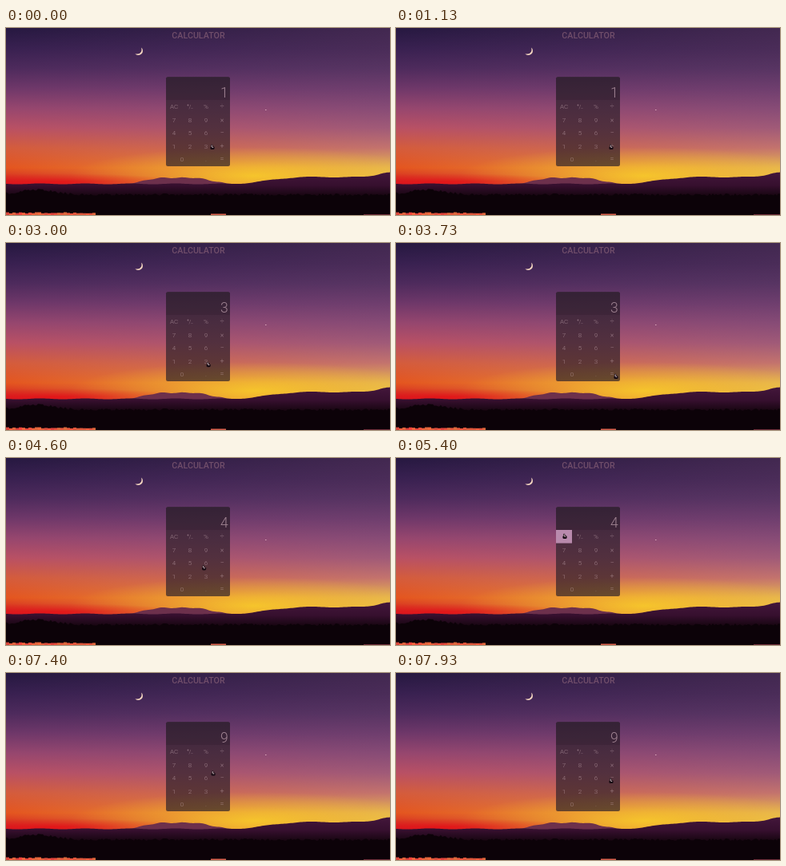
An HTML page with a canvas for the animation above (8 s loop, 480 by 234 pixels).

```html
<!DOCTYPE html>
<html lang="en">
<head>
<meta charset="utf-8">
<title>Calculator</title>
<style>
  html, body { margin: 0; width: 100%; height: 100%; overflow: hidden; background: #0c0208; }
  canvas { display: block; width: 480px; height: 234px; }
</style>
</head>
<body>
<canvas id="stage" width="480" height="234"></canvas>
<script>
const W = 480, H = 234, LOOP = 8000, PRESS = 130;
const CELL_W = 20, CELL_H = 16.6, LEFT = 200, TOP = 90;
const FONT = 'Roboto, sans-serif';
const INK = 'rgba(205,176,184,.62)';
const KEYS = ['AC', '', '%', '÷', ...'789×456−123+'];
const SKY_LEFT = ['#261840', '#382050', '#4d2a5c', '#6e3769', '#96466e', '#b95064', '#d45c3c', '#e4551f', '#c80f28'];
const SKY_RIGHT = ['#422850', '#4a2c58', '#573462', '#6e3e6e', '#874b76', '#a05a78', '#c3736e', '#e6b450', '#f0c840'];

// Pointer moves, each ending over a key that may be pressed
const START = { x: 258, y: 149 };
const MOVES = [
  { go: 70, at: 330, x: 269, y: 149, press: 900, shows: '1' },
  { go: 1470, at: 2200, x: 250, y: 150, press: 2600, shows: '3' },
  { go: 2800, at: 3700, x: 275, y: 167, press: 4000, shows: '4' },
  { go: 4270, at: 5000, x: 211, y: 98, press: 5335, shows: '0' },
  { go: 5730, at: 6330, x: 250, y: 117, press: 6600, shows: '9' },
  { go: 6930, at: 7900, x: 269, y: 135 }
];

const ctx = document.getElementById('stage').getContext('2d');
const scene = document.createElement('canvas');
scene.width = W;
scene.height = H;

const bump = (x, center, width) => Math.exp(-(((x - center) / width) ** 2));
const ease = u => {
  const k = Math.min(1, Math.max(0, u));
  return k * k * (3 - 2 * k);
};

function seeded(seed) {
  return () => (seed = (seed * 16807) % 2147483647) / 2147483647;
}

function blend(g, colors) {
  colors.forEach((color, i) => g.addColorStop(i / (colors.length - 1), color));
  return g;
}

function ridge(c, fill, height, from = 0, to = W) {
  c.fillStyle = fill;
  c.beginPath();
  c.moveTo(from, H);
  for (let x = from; x <= to; x += 2) c.lineTo(x, height(x));
  c.lineTo(to, H);
  c.fill();
}

function glow(c, x, y, rx, ry, rgb, alpha) {
  c.save();
  c.translate(x, y);
  c.scale(rx, ry);
  c.fillStyle = blend(c.createRadialGradient(0, 0, 0, 0, 0, 1),
    [`rgba(${rgb},${alpha})`, `rgba(${rgb},${alpha * 0.4})`, `rgba(${rgb},0)`]);
  c.fillRect(-1, -1, 2, 2);
  c.restore();
}

function drawSky(c) {
  const sky = colors => blend(c.createLinearGradient(0, 0, 0, 200), colors);
  c.fillStyle = sky(SKY_RIGHT);
  c.fillRect(0, 0, W, H);
  c.fillStyle = sky(SKY_LEFT);
  for (let x = 0; x < W; x++) {
    c.globalAlpha = 1 - x / W;
    c.fillRect(x, 0, 1, H);
  }
  c.globalAlpha = 1;
  glow(c, 310, 185, 230, 36, '250,210,40', 0.8);
  glow(c, 60, 193, 170, 11, '230,12,20', 0.8);

  // Crescent moon and a faint star
  c.fillStyle = '#f5d6c0';
  c.beginPath();
  c.arc(165.5, 28.5, 5.5, -0.8, 2.37);
  c.quadraticCurveTo(170.9, 33.9, 169.3, 24.6);
  c.fill();
  c.fillStyle = '#d8a5b8';
  c.fillRect(324, 102, 1.5, 1);
}

function drawLand(c) {
  ridge(c, '#6c304c', x => 196 - 8 * bump(x, 235, 32) - 7 * bump(x, 190, 28) + 0.5 * Math.sin(x / 4), 140, 310);
  const land = blend(c.createLinearGradient(0, 182, 0, 212), ['#42163a', '#360f2e', '#12040c']);
  ridge(c, land, x => 195 - 8.5 * ease((x - 280) / 95) - 6 * bump(x, 478, 18) + 0.5 * Math.sin(x / 9));

  const rand = seeded(41);
  ridge(c, '#0c0208', x => 207 - 6 * bump(x, 38, 32) + rand() * 3);

  // Broken reflections in the water
  for (let x = 0; x < 110; x += 4) {
    c.fillStyle = `rgb(${215 + rand() * 30},${65 + rand() * 40},60)`;
    c.fillRect(x, 230.5 + rand() * 1.5, 4, 4);
  }
  c.fillStyle = '#d8604c';
  c.fillRect(256, 232.5, 19, 1.5);
  c.fillStyle = '#6c2c38';
  c.fillRect(447, 233, 33, 1);
}

function label(c, text, x, y, size, weight, color, align = 'center') {
  c.font = `${weight} ${size}px ${FONT}`;
  c.textAlign = align;
  c.fillStyle = color;
  c.fillText(text, x, y);
}

function drawCalculator(c) {
  label(c, 'CALCULATOR', 240.5, 12.8, 10.7, 500, 'rgba(165,118,135,.52)');
  c.fillStyle = 'rgba(42,32,40,.68)';
  c.beginPath();
  c.roundRect(LEFT, 61, 80, 112, 2.5);
  c.fill();
  c.fillStyle = 'rgba(30,20,32,.18)';
  c.fillRect(LEFT, 62, 80, TOP - 62);

  const key = (text, col, row) => label(c, text, LEFT + (col + 0.5) * CELL_W, 101 + row * 16.5,
    /[÷×−+=]/.test(text) ? 9 : 8, 300, INK);
  KEYS.forEach((text, i) => key(text, i % 4, Math.floor(i / 4)));
  key('0', 0.5, 4);
  key('.', 2, 4);
  key('=', 3, 4);
  label(c, '+', 227.4, 98, 5, 400, INK);
  label(c, '/', 230, 101, 7, 300, INK);
  label(c, '−', 232.8, 102, 5, 400, INK);
}

function pointerAt(t) {
  return MOVES.reduce((p, m) => {
    const k = ease((t - m.go) / (m.at - m.go));
    return { x: p.x + (m.x - p.x) * k, y: p.y + (m.y - p.y) * k };
  }, START);
}

function drawPointer({ x, y }) {
  ctx.fillStyle = '#160a12';
  ctx.beginPath();
  ctx.roundRect(x - 2.6, y - 1, 5.2, 4, 1.6);
  ctx.roundRect(x - 2, y - 3.2, 2.4, 4, 1);
  ctx.fill();
  ctx.fillStyle = '#dcc6cc';
  ctx.fillRect(x - 1.3, y - 2.5, 1, 2.4);
  ctx.fillRect(x - 0.5, y - 0.2, 1.7, 1);
}

function drawPress({ x, y }) {
  const col = Math.floor((x - LEFT) / CELL_W), row = Math.floor((y - TOP) / CELL_H);
  ctx.fillStyle = '#b98aad';
  ctx.fillRect(LEFT + col * CELL_W, TOP + row * CELL_H, CELL_W, CELL_H);
}

function draw(now) {
  // The screen updates 15 times a second
  const t = Math.floor((now % LOOP) * 0.015 + 0.06) / 0.015 % LOOP;
  ctx.drawImage(scene, 0, 0);
  const done = MOVES.filter(m => t >= m.press + PRESS);
  const value = done.length ? done[done.length - 1].shows : '1';
  label(ctx, value, 277.7, 87.3, 17.5, 300, 'rgba(198,168,180,.72)', 'right');
  const held = MOVES.find(m => t >= m.press && t < m.press + PRESS);
  if (held) drawPress(held);
  drawPointer(pointerAt(t));
}

const origin = performance.now();
function tick() {
  draw(performance.now() - origin);
  requestAnimationFrame(tick);
}

const base = scene.getContext('2d');
drawSky(base);
drawLand(base);
drawCalculator(base);
tick();
</script>
</body>
</html>
```
